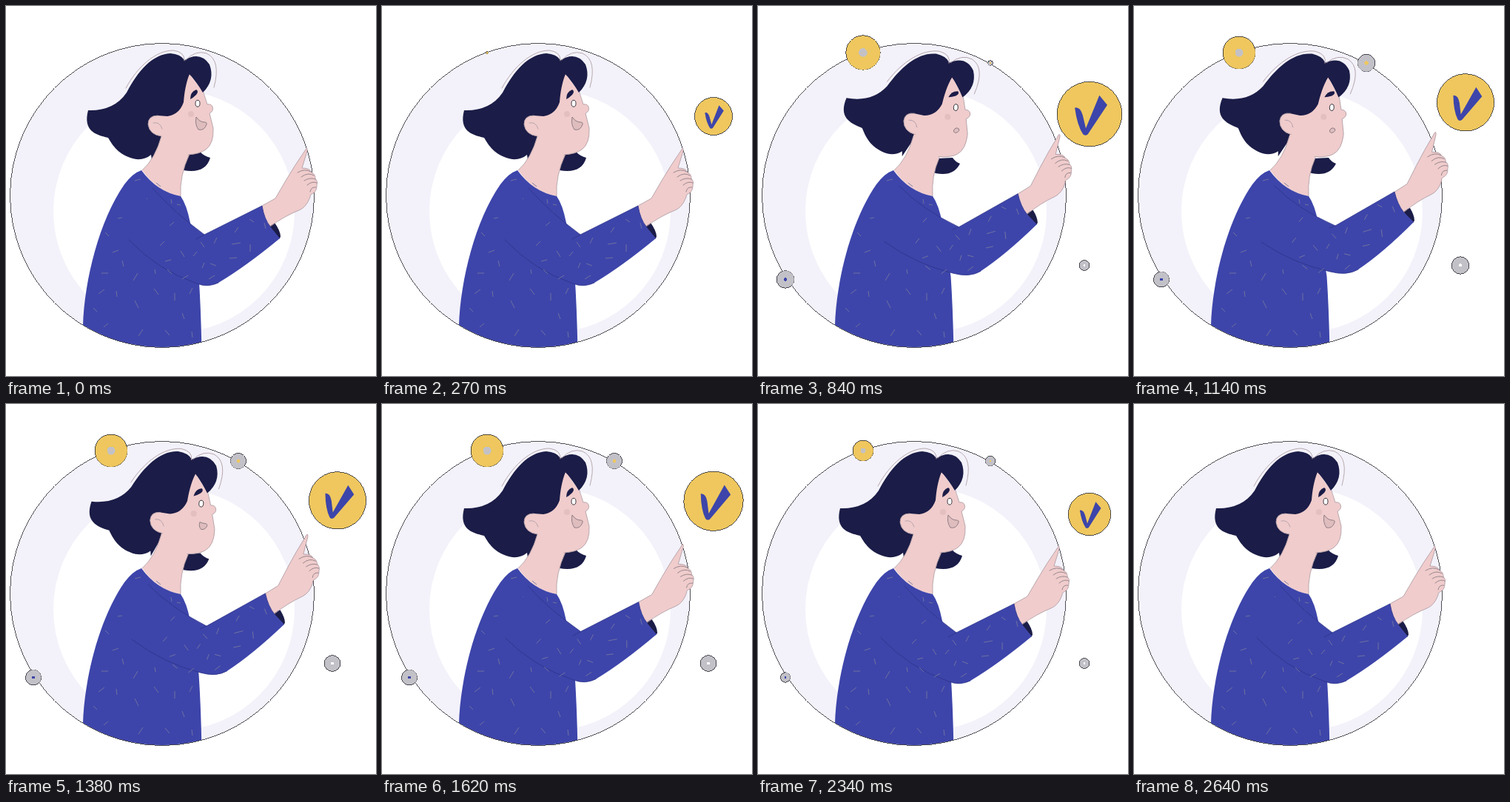
Write an HTML page that moves like this. It is 500 by 500 pixels and loops after 2910 ms.

```html
<!DOCTYPE html>
<html lang="en">
<head>
<meta charset="utf-8">
<title>Pointing at a check mark</title>
<style>
  html, body { margin: 0; width: 100%; height: 100%; overflow: hidden; background: #fff; }
  svg { display: block; width: 100vw; height: 100vh; }
  .hair { fill: #1b1c47; }
  .skin { fill: #f0cccc; }
  .cloth { fill: #3d45aa; }
  .line { fill: none; stroke: #b3a0a8; stroke-width: .9; stroke-linecap: round; }
  .seam { fill: none; stroke: #2d3389; stroke-width: .8; stroke-linecap: round; }
  .dash { fill: none; stroke: #74779f; stroke-width: .9; }
  .rim { stroke: #26262e; stroke-width: .8; shape-rendering: crispEdges; }
  .rim circle { vector-effect: non-scaling-stroke; }
  .gold { fill: #efc75e; }
  .grey { fill: #c2c1c8; }
</style>
</head>
<body>
<svg viewBox="0 0 500 500">
  <clipPath id="disc"><circle cx="211" cy="256" r="205"/></clipPath>
  <circle cx="211" cy="256" r="205.5" fill="#f3f2fa"/>
  <ellipse cx="227" cy="277.5" rx="163" ry="164" fill="#fff"/>

  <path id="lobe" class="hair"/>
  <g class="head">
    <path class="hair" d="M111 141Q146 142 163 117C178 88 198 65 222 64Q236 65 241 73L250 92L244 150L212 176L197 208L196 201Q188 208 176 207C155 203 146 192 138 178C120 174 104 168 111 141Z"/>
  </g>
  <path id="neck" class="skin"/>
  <path id="neckLine" class="line"/>
  <g class="head">
    <path class="skin" d="M248 92C243 104 241 118 240 130Q234 147 218 149L205 148Q192 148 192 160Q194 174 210 176L246 201Q262 200 270 194Q281 186 280 165L275 145Q281 142 279 136Q277 132 272 133L266 116Z"/>
    <path class="line" d="M205 148Q192 148 192 160Q194 174 210 176M199 158Q208 156 211 166M246 201Q262 200 270 194Q281 186 280 165L275 145Q281 142 279 136Q277 132 272 133L267 117"/>
    <path class="hair" d="M240 74Q262 60 275 79Q283 100 266 117Q259 105 248 92L240 100Z"/>
    <path class="line" d="M162 111C178 81 203 60 226 60Q242 62 241 74M243 73Q256 59 271 64Q291 73 281 110"/>
    <circle cx="250" cy="146" r="4" fill="#e3bfc0"/>
    <ellipse cx="259" cy="131.7" rx="3" ry="4.4" fill="#fff" stroke="#26262e" stroke-width=".9"/>
    <path id="brow" class="hair" d="M249 126Q249 116 257 113Q261 115 257 120Q253 124 249 126Z"/>
    <path id="mouth" fill="#dfbcbd" stroke="#85787d" stroke-width=".9"/>
  </g>

  <g clip-path="url(#disc)">
    <path class="cloth" d="M183 222Q204 251 236 257Q244 268 249 293L260.5 365Q263.5 410 264.5 470L104 470V432C106 370 126 290 160 241Q171 226 183 222Z"/>
    <path class="dash" d="M174 236l8-2M203 239l6 5M190 260l5 5M223 261l1 6M231 268l5 1M202 285l7-3M151 287l6-1M178 296l5 14M198 303l4-8M231 278v9M134 306l5 5M144 333l8-3M186 323l5 5M129 361h9M157 344l2 8M172 371l6-10M201 356l1 6M125 389l8-6M149 385l1 8M174 398l5 10M200 382l6 8M228 388v10M248 389l4-8M238 415l3 8M118 408l5 5M132 434l6-5M179 446l6-9M215 438l6 7M251 440l1 8"/>
  </g>
  <circle class="rim" cx="211" cy="256" r="205.5" fill="none"/>

  <path id="cuff" class="hair"/>
  <g id="hand">
    <path class="skin" d="M344 271L364 260L378 236Q391 214 403 197Q408 188 407 196L400 219Q411 219 413 225Q418 227 418 233Q422 237 420 243Q420 250 415 253Q410 255 411 258Q406 272 396 276Q376 284 356 298Z"/>
    <path class="line" d="M346 270L364 260L378 236Q391 214 403 197Q408 188 407 196L400 219Q411 219 413 225Q418 227 418 233Q422 237 420 243Q420 250 415 253Q410 255 411 258Q406 272 396 276Q376 284 357 298"/>
    <path class="line" style="stroke:#8f8087" d="M394 225Q404 219 412 224M399 231Q408 224 416 229M403 236Q411 231 418 234M407 242Q414 236 420 239M411 251Q412 244 419 245"/>
  </g>
  <path id="sleeve" class="cloth"/>
  <path id="sleeveLine" class="seam"/>
  <path id="armDash" class="dash" d="M221 297l6-5M208 324l6-6M236 331l5 8M215 345l8-2M218 356l6 6M238 369l8-5M253 338l5-6M263 319l5 7M281 321l4-8M305 322l12-2M330 322v10M329 288l6 4M309 306l5-7M302 341l10-1M276 348l8 3M265 354l3-7M274 369l8-5M349 293l2 8"/>

  <g id="check" class="rim">
    <circle class="gold" r="48"/>
    <path class="cloth" stroke="none" shape-rendering="auto" d="M-22-9Q-14-11-10 2L-5 21L14-28L26-14L-2 30Q-6 33-9 30Q-18 17-22-9Z"/>
  </g>
  <!-- Dots carry a rim only where they stick out of the disc. -->
  <g class="rim"><g id="dots"></g></g>
  <use href="#dots" clip-path="url(#disc)"/>
</svg>
<script>
const LOOP = 2910, STEP = 30;
const $ = id => document.getElementById(id);
const smooth = u => u * u * (3 - 2 * u);
const linear = u => u;

// Value at time t on a track of [time, value] pairs.
function track(t, keys, ease = smooth) {
  const i = keys.findIndex(k => k[0] > t);
  if (i === 0) return keys[0][1];
  if (i < 0) return keys[keys.length - 1][1];
  const [t0, a] = keys[i - 1], [t1, b] = keys[i];
  return a + (b - a) * ease((t - t0) / (t1 - t0));
}

// Blend two paths that share the same commands.
function mix(a, b, p) {
  const ends = b.match(/-?[\d.]+/g);
  let i = 0;
  return a.replace(/-?[\d.]+/g, n => (+n + (ends[i++] - n) * p).toFixed(2));
}

const headShapes = {
  lobe: ["M240 222Q270 227 276 205Q268 203 262 197L244 200L236 220Z",
         "M240 226Q264 231 273 213Q266 210 263 205L243 206L236 224Z"],
  neck: ["M211 172Q202 206 184 222Q204 251 236 257Q234 230 248 200L248 180Z",
         "M211 172Q202 206 184 222Q204 251 236 257Q234 230 245 205L248 180Z"],
  neckLine: ["M210 176Q202 206 184 222M236 257Q234 230 248 200",
             "M210 176Q202 206 184 222M236 257Q234 230 245 205"],
  mouth: ["M257 150Q255 160 260 167Q268 169 271 160Q272 157 268 157Q262 157 257 150Z",
          "M261 162Q260 165 263 166Q267 165 268 162Q268 159 265 159Q262 159 261 162Z"]
};
const armShapes = {
  sleeve: ["M198 246Q225 277 268 309L346 270Q349 288 357 298L370 314Q324 352 287 374Q272 381 258 375Q205 357 166 316Z",
           "M190 243Q220 274 272 297L352 251Q356 268 364 278L378 292Q336 334 303 356Q288 365 265 359Q215 348 172 319Z"],
  sleeveLine: ["M198 246Q225 277 268 309M257 315L268 309L346 270Q349 288 357 298M287 374Q272 381 258 375Q205 357 166 316",
               "M190 243Q220 274 272 297M264 300L272 297L352 251Q356 268 364 278M303 356Q288 365 265 359Q215 348 172 319"],
  cuff: ["M355 296L363 293Q371 304 371 312L369 315Z",
         "M362 276L373 273Q379 283 379 290L377 293Z"]
};

// x, y, radius, fill class, core radius, core colour, start, peak
const dots = [
  [142, 63, 22, "gold", 5.5, "#c2c1c8", 240, 1.18],
  [37, 369.5, 10.5, "grey", 2, "#3d45aa", 420, 1.15],
  [441, 350.5, 10.8, "grey", 2, "#fff", 600, 1.15],
  [314, 77, 10.5, "grey", 2.4, "#efc75e", 720, 1.15]
];
$("dots").innerHTML = dots.map(([x, y, r, kind, core, color]) =>
  `<g><circle class="${kind}" r="${r}"/><circle r="${core}" fill="${color}" stroke="none"/></g>`).join("");

function place(node, x, y, scale, turn = 0) {
  node.setAttribute("visibility", scale > 0.01 ? "visible" : "hidden");
  node.setAttribute("transform", `translate(${x} ${y}) rotate(${turn}) scale(${scale})`);
}

function morph(shapes, p) {
  for (const id in shapes) $(id).setAttribute("d", mix(...shapes[id], p));
}

function draw(t) {
  const head = track(t, [[300, 0], [750, 1], [1200, 1], [1590, 0]]);
  const arm = track(t, [[450, 0], [960, 1], [1200, 1], [1740, 0]]);
  const push = track(t, [[780, 0], [1020, 1], [1590, 1], [1830, 0]]);
  const exit = track(t, [[2130, 1], [2640, 0]]);

  morph(headShapes, head);
  document.querySelectorAll(".head").forEach(g => g.setAttribute("transform",
    `translate(${4 * head} ${-3 * head}) rotate(${8.5 * head} 205 165)`));
  $("brow").setAttribute("transform",
    `translate(0 ${-4.5 * head}) rotate(${18 * head} 254 119)`);

  morph(armShapes, arm);
  $("hand").setAttribute("transform",
    `translate(${6.5 * arm} ${-19 * arm}) rotate(${-3.5 * arm} 355 284)`);
  $("armDash").setAttribute("transform", `rotate(${-7.5 * arm} 180 280)`);

  const size = track(t, [[90, 0], [450, 1.12], [780, 1], [1020, .85], [1560, .85], [1830, 1]], linear);
  place($("check"), 448, 149 - 18.6 * push, size * exit * .948, 8 * push);

  dots.forEach(([x, y, , , , , start, peak], i) => {
    const grow = track(t, [[start, 0], [start + 430, peak], [start + 670, 1]], linear);
    place($("dots").children[i], x, y, grow * exit);
  });
}

function frame(now) {
  draw(Math.floor(now % LOOP / STEP) * STEP);
  requestAnimationFrame(frame);
}
draw(0);
requestAnimationFrame(frame);
</script>
</body>
</html>
```
